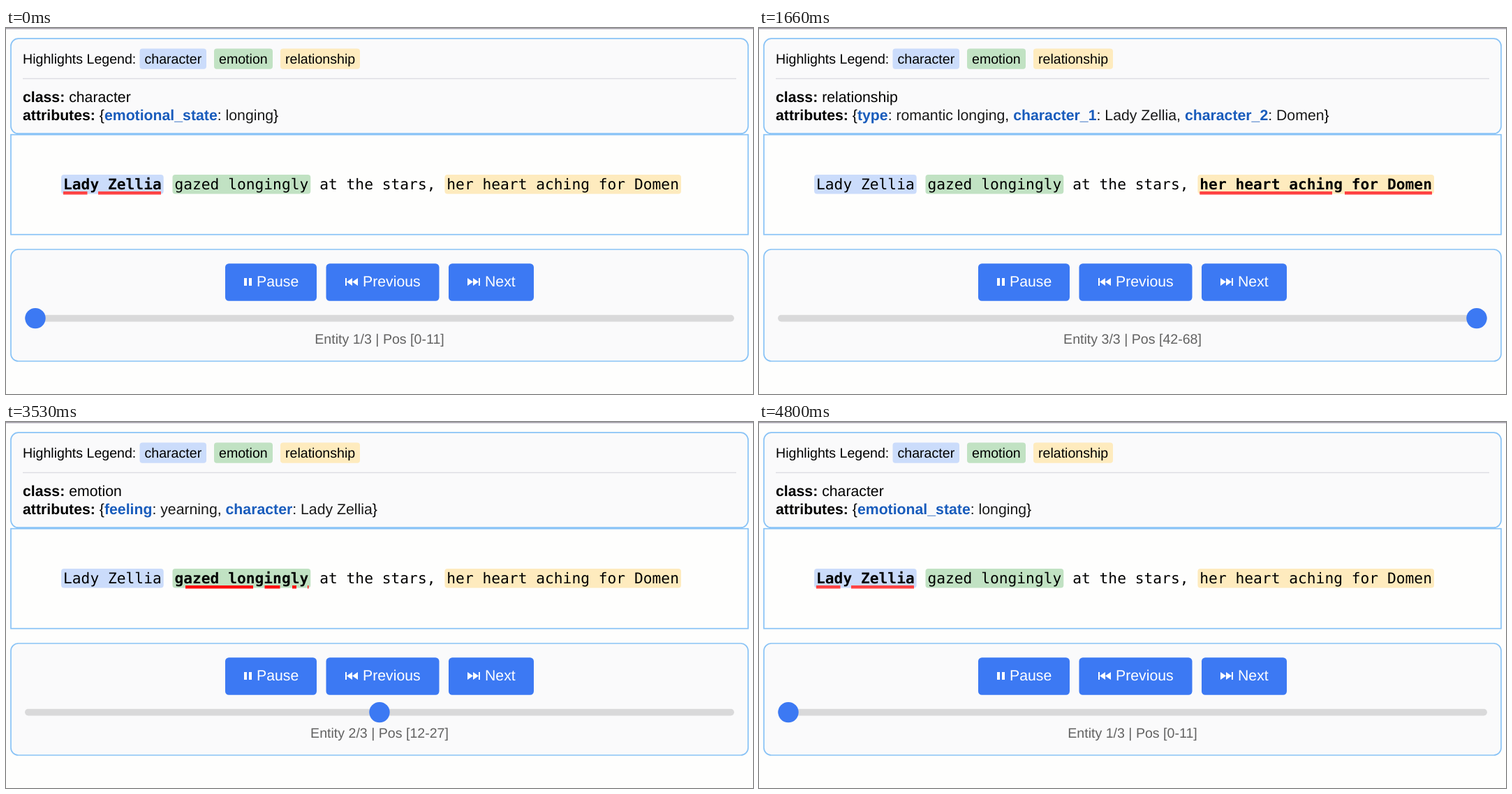
An HTML page for the animation above (4860 ms loop, 1070 by 524 pixels).

```html
<!DOCTYPE html>
<html lang="en">
<head>
<meta charset="utf-8">
<title>Highlighted entities</title>
<style>
  html, body { margin: 0; width: 100%; height: 100%; overflow: hidden; background: #fefefd; }
  svg { display: block; width: 1070px; height: 524px; }
  text { font: 21.26px "Liberation Sans", Arial, sans-serif; white-space: pre; text-rendering: geometricPrecision; }
  .small { font-size: 19.6px; }
  .mono { font-family: "DejaVu Sans Mono", Menlo, monospace; }
  .bold { font-weight: 700; }
  .key { font-weight: 700; fill: #195cbc; }
  .value { fill-opacity: .9; }
  .panel { fill: #fafafb; stroke: #89c3f6; stroke-width: 1.7; }
  .button { fill: #3c79f3; }
  .white { fill: #fff; }
  .character { fill: #cbdcfb; }
  .emotion { fill: #c1e2c3; }
  .relationship { fill: #feebbe; }
</style>
</head>
<body>
<svg id="stage" viewBox="0 0 1070 524"></svg>
<script>
const NS = "http://www.w3.org/2000/svg";
const stage = document.getElementById("stage");
const STEP = 800, LOOP = 4860, PULSE = 1000;
const CHAR = 12.8, PAD = 2.9;

function add(tag, attrs, text, parent = stage) {
  const node = document.createElementNS(NS, tag);
  for (const name in attrs) node.setAttribute(name, attrs[name]);
  if (text !== undefined) node.textContent = text;
  parent.append(node);
  return node;
}
const box = (cls, x, y, width, height, rx = 0) =>
  add("rect", { class: cls, x, y, width, height, rx });
const label = (cls, x, y, text) => add("text", { class: cls, x, y }, text);
const span = (parent, cls, text) => add("tspan", { class: cls }, text, parent);

// x: text start; lines: underline pieces that leave out the descenders
const entities = [
  { type: "character", text: "Lady Zellia", pos: "0-11", x: 82, knob: 42,
    attrs: { emotional_state: "longing" },
    lines: [[82, 116.5], [132, 222]] },
  { type: "emotion", text: "gazed longingly", pos: "12-27", x: 241.4, knob: 535,
    attrs: { feeling: "yearning", character: "Lady Zellia" },
    lines: [[257, 354], [370.5, 392.5], [410, 416], [432, 433.4]] },
  { type: "relationship", text: "her heart aching for Domen", pos: "42-68", x: 631.3, knob: 1028,
    attrs: { type: "romantic longing", character_1: "Lady Zellia", character_2: "Domen" },
    lines: [[631.3, 821], [839, 964]] }
];

// Page and legend panel
box("", 0, 0, 1070, 1.6).setAttribute("fill", "#a7a3ac");
box("panel", 7, 15.2, 1056, 136, 10.6);
label("small", 24, 50.6, "Highlights Legend:");
[["character", 191.5, 95.5], ["emotion", 298, 84], ["relationship", 393, 114]].forEach(([name, x, w]) => {
  box(name, x, 29.5, w, 29.2, 4);
  label("small", x + 7, 50.6, name);
});
box("", 24, 71.8, 1022, 1.4).setAttribute("fill", "#dcdce2");
const classLine = label("", 24, 106.4);
const attrLine = label("", 24, 131.9);

// Sentence
const frame = box("panel", 7, 152.7, 1056, 143);
frame.style.fill = "#fefefd";
for (const e of entities) {
  box(e.type, e.x - PAD, 210, e.text.length * CHAR + 2 * PAD, 27.6, 4);
  e.underline = add("path", {
    d: e.lines.map(([a, b]) => `M${a} 236.2H${b}`).join(""),
    "stroke-width": 4.4
  });
  e.label = label("mono", e.x, 231.2, e.text);
}
label("mono", 449.2, 231.2, "at the stars,");

// Controls
box("panel", 7, 317, 1056, 160, 10.6);
[[314, 131, 359, "Pause", "M341 358h4v11h-4zM348 358h4v11h-4z"],
 [458.5, 162, 511, "Previous", "M486 358h2v11h-2zM496 358v11l-8-5.5zM504 358v11l-8-5.5z"],
 [634, 122, 686, "Next", "M661 358v11l8-5.5zM669 358v11l8-5.5zM677 358h2v11h-2z"]
].forEach(([x, w, textX, text, icon]) => {
  box("button", x, 337.2, w, 53.6, 5.3);
  add("path", { class: "white", d: icon });
  label("white", textX, 370.2, text);
});
box("", 27, 410.8, 1016, 9.6, 4.8).setAttribute("fill", "#d9d9da");
const knob = add("circle", { class: "button", cy: 415.6, r: 14.7 });
const status = add("text", { class: "small", x: 535, y: 451.6, "text-anchor": "middle", fill: "#626262" });

function select(index) {
  const current = entities[index];
  classLine.replaceChildren();
  span(classLine, "bold", "class:");
  span(classLine, "", " " + current.type);
  attrLine.replaceChildren();
  span(attrLine, "bold", "attributes:");
  span(attrLine, "", " {");
  Object.entries(current.attrs).forEach(([key, value], i) => {
    if (i) span(attrLine, "", ", ");
    span(attrLine, "key", key);
    span(attrLine, "value", ": " + value);
  });
  span(attrLine, "", "}");
  for (const e of entities) {
    e.label.classList.toggle("bold", e === current);
    e.underline.style.display = e === current ? "" : "none";
  }
  knob.setAttribute("cx", current.knob);
  status.textContent = `Entity ${index + 1}/3 | Pos [${current.pos}]`;
}

// CSS ease-in-out: cubic-bezier(.42, 0, .58, 1)
function easeInOut(x) {
  let lo = 0, hi = 1;
  for (let i = 0; i < 20; i++) {
    const s = (lo + hi) / 2;
    const bx = 1.26 * s * (1 - s) ** 2 + 1.74 * s * s * (1 - s) + s ** 3;
    if (bx < x) lo = s; else hi = s;
  }
  return lo * lo * (3 - 2 * lo);
}

let shown = -1;
function render(ms) {
  const t = ms % LOOP;
  const index = Math.floor(t / STEP) % entities.length;
  if (index !== shown) select(shown = index);
  const phase = (t % STEP) / PULSE * 2;
  const glow = phase < 1 ? 1 - easeInOut(phase) : easeInOut(phase - 1);
  const level = Math.round(68 * glow);
  entities[index].underline.setAttribute("stroke", `rgb(255,${level},${level})`);
}

const start = performance.now();
function tick() {
  render(performance.now() - start);
  requestAnimationFrame(tick);
}
tick();
</script>
</body>
</html>
```
